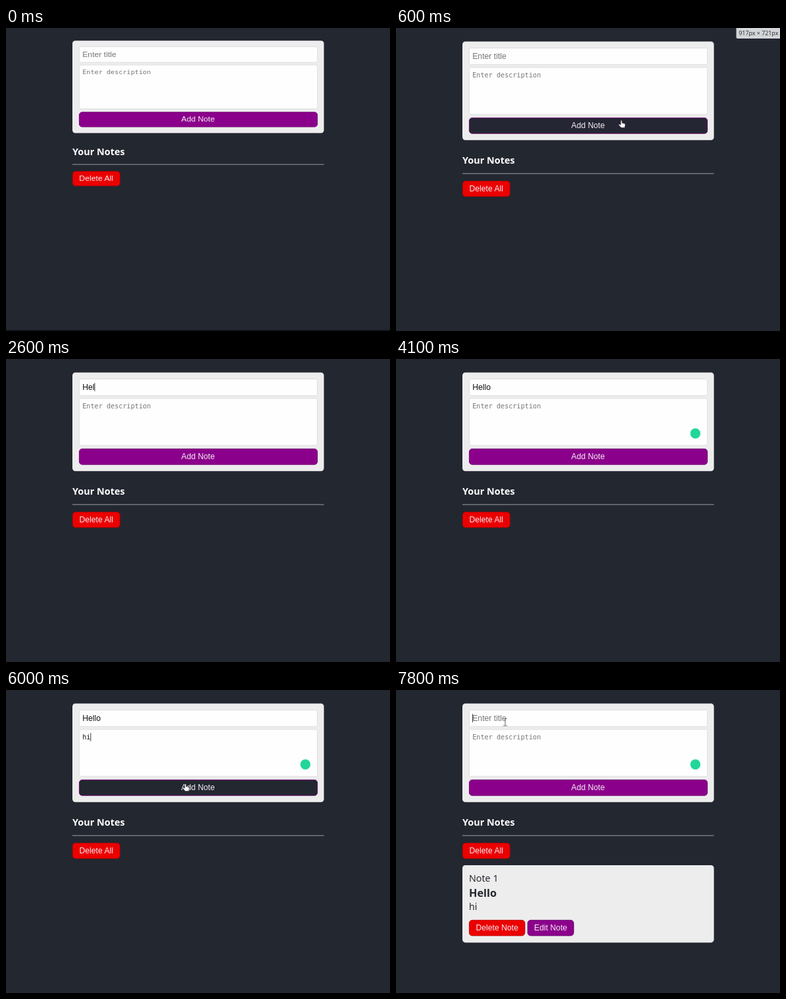
Write an HTML page that moves like this. It is 584 by 460 pixels and loops after 8000 ms.

```html
<!DOCTYPE html>
<html lang="en">
<head>
<meta charset="utf-8">
<title>Notes</title>
<style>
  html, body { margin: 0; width: 100%; height: 100%; overflow: hidden; background: #232730; }
  svg { display: block; width: 584px; height: 460px; }
  text { white-space: pre; }
  .ui { font: 12.23px "Liberation Sans", Arial, sans-serif; }
  .mono { font: 10.19px "DejaVu Sans Mono", monospace; }
  .body { font: 14.27px "Noto Sans", "Open Sans", sans-serif; fill: #272a31; }
  .head { font: bold 14.45px "Noto Sans", "Open Sans", sans-serif; fill: #fff; }
  .name { font: bold 16.3px "Noto Sans", "Open Sans", sans-serif; fill: #23262d; }
  .tag { font: 8.9px "Noto Sans", "Open Sans", sans-serif; fill: #30343a; }
  .light { fill: #f6eef6; }
  .card { fill: #ededed; }
  .field { fill: #fefefe; stroke: #dadada; stroke-width: .8; }
  .red { fill: #eb0000; stroke: #bd0000; stroke-width: .9; }
  .purple { fill: #8b008b; stroke: #6c006f; stroke-width: .9; }
</style>
</head>
<body>
<svg viewBox="0 0 584 460">
  <rect width="584" height="460" fill="#232730"/>
  <g id="page">
    <rect class="card" x="101" y="20.5" width="382.5" height="149.7" rx="4.5"/>
    <rect class="field" x="111.4" y="30.4" width="362.2" height="25.2" rx="2.5"/>
    <rect class="field" x="111.4" y="59.9" width="362.2" height="71.2" rx="2.5"/>
    <text class="ui" id="title" x="116.2" y="47"/>
    <text class="mono" id="desc" x="116.2" y="74.8"/>
    <rect id="caret" width=".8" height="12.6" fill="#111"/>
    <circle id="badge" cx="455.3" cy="113" r="7.7" fill="#22d69a"/>
    <rect id="add" class="purple" x="111.4" y="136.4" width="362.2" height="23.8" rx="4.5"/>
    <text class="ui light" x="292" y="152" text-anchor="middle">Add Note</text>
    <text class="head" x="101" y="206">Your Notes</text>
    <rect x="101" y="220.5" width="382.5" height="1" fill="#a0a2a6"/>
    <rect class="red" x="101.4" y="232.4" width="71.8" height="23.4" rx="4.5"/>
    <text class="ui light" x="137.2" y="247.9" text-anchor="middle">Delete All</text>
    <g id="note">
      <rect class="card" x="101" y="266" width="382.5" height="117.4" rx="4.5"/>
      <text class="body" x="111" y="291.3">Note 1</text>
      <text class="name" x="111" y="313.7">Hello</text>
      <text class="body" x="111" y="334">hi</text>
      <rect class="red" x="111.4" y="349.4" width="84.6" height="23.6" rx="4.5"/>
      <text class="ui light" x="153.7" y="365.2" text-anchor="middle">Delete Note</text>
      <rect class="purple" x="200.2" y="349.4" width="70" height="23.6" rx="4.5"/>
      <text class="ui light" x="235.2" y="365.2" text-anchor="middle">Edit Note</text>
    </g>
  </g>
  <rect id="edge" y="458.4" width="584" height="1.6" fill="#12151b"/>
  <g id="tag">
    <path d="M517.5 0H584V16H519.5Q517.5 16 517.5 14Z" fill="#d3d5d8"/>
    <text class="tag" x="551.3" y="11.3" text-anchor="middle">917px × 721px</text>
  </g>
  <g id="mouse">
    <path id="beam" d="M-2.6 -5.6Q0 -5.6 0 -4.4Q0 -5.6 2.6 -5.6M0 -4.6V4.6M-2.6 5.6Q0 5.6 0 4.4Q0 5.6 2.6 5.6" fill="none" stroke="#555" stroke-width=".9"/>
    <path id="hand" d="M-1 .8Q0 -.6 1 .8V4L5 5Q6 5.4 5.8 6.8L5 11H-.4L-4 7Q-4.4 5.6 -2.8 5.8L-1 7Z" fill="#fff" stroke="#24202b" stroke-width=".5"/>
    <path id="arrow" d="M0 0V10.2L2.5 8L4.1 11.6L5.8 10.8L4.2 7.4H7.4Z" fill="#20242c" stroke="#eee" stroke-width=".9" stroke-linejoin="round"/>
  </g>
</svg>
<script>
const LOOP = 8000;
const $ = id => document.getElementById(id);
const show = (id, on) => $(id).setAttribute('display', on ? 'inline' : 'none');
const place = (id, attrs) => { for (const k in attrs) $(id).setAttribute(k, attrs[k]); };
const clamp = v => Math.min(1, Math.max(0, v));
const mix = (a, b, k) => a + (b - a) * k;

// CSS "ease" curve
function ease(x) {
  let lo = 0, hi = 1, s = .5;
  for (let i = 0; i < 18; i++) {
    s = (lo + hi) / 2;
    const u = 1 - s;
    if (.75 * u * u * s + .75 * u * s * s + s * s * s < x) lo = s; else hi = s;
  }
  const u = 1 - s;
  return .3 * u * u * s + 3 * u * s * s + s * s * s;
}

// [time, x, y] for the two spells in which the pointer is visible
const trips = [
  [[180, 425, 128], [300, 366, 144], [400, 354, 144.5], [550, 352, 144.5], [700, 325, 132], [900, 222, 74], [1100, 169, 41], [1900, 169, 41]],
  [[5200, 282, 104], [5450, 274, 138], [5600, 273, 142.5], [6450, 273, 142.5], [6600, 272, 168], [6700, 270, 204.5],
   [6780, 268, 208], [6900, 238, 150], [7050, 188, 85], [7200, 166, 50], [7400, 166, 49], [LOOP, 166, 49]]
];

function pointer(t) {
  for (const trip of trips) {
    for (let i = 1; i < trip.length; i++) {
      const [t0, x0, y0] = trip[i - 1], [t1, x1, y1] = trip[i];
      if (t >= t0 && t < t1) {
        const k = (t - t0) / (t1 - t0);
        return [mix(x0, x1, k), mix(y0, y1, k)];
      }
    }
  }
  return null;
}

const hovers = [[210, 700], [5480, 6645]];
const hoverAt = t => Math.max(...hovers.map(([on, off]) =>
  t < off ? ease(clamp((t - on) / 500)) : 1 - ease(clamp((t - off) / 500))));

const titleKeys = [1900, 2100, 2400, 2800, 3000];
const descKeys = [4600, 4900];
const ADDED = 6200;

// focus periods: [from, to, field]
const focuses = [[1500, 3200, 'title'], [3200, ADDED, 'desc'], [7400, LOOP, 'title']];

function typed(word, keys, t) {
  return t < ADDED ? word.slice(0, keys.filter(k => k <= t).length) : '';
}

function fill(id, value, hint) {
  $(id).textContent = value || hint;
  $(id).setAttribute('fill', value ? '#111' : '#757575');
}

function drawCaret(t, values) {
  const focus = focuses.find(([a, b]) => t >= a && t < b);
  if (!focus) return show('caret', false);
  const [from, , field] = focus;
  const last = Math.max(from, ...[...titleKeys, ...descKeys].filter(k => k <= t));
  show('caret', (t - last) % 1000 < 500);
  const width = values[field] ? $(field).getComputedTextLength() : 0;
  place('caret', { x: 116.2 + width, y: field === 'title' ? 36.3 : 65.2 });
}

function drawMouse(t) {
  const p = pointer(t);
  show('mouse', p);
  if (!p) return;
  const [x, y] = p;
  const inside = (top, bottom) => x > 111 && x < 474 && y > top && y < bottom;
  const kind = inside(136, 160.5) ? 'hand' : inside(30, 56) || inside(59.5, 131.5) ? 'beam' : 'arrow';
  for (const id of ['beam', 'hand', 'arrow']) show(id, id === kind);
  place('mouse', { transform: `translate(${x} ${y})` });
}

function draw(t) {
  const squashed = t < 100;
  place('page', { transform: `scale(1 ${squashed ? .937 : 1})` });
  show('edge', squashed);
  show('tag', t >= 100 && t < 1000);

  const values = { title: typed('Hello', titleKeys, t), desc: typed('hi', descKeys, t) };
  fill('title', values.title, 'Enter title');
  fill('desc', values.desc, 'Enter description');
  drawCaret(t, values);

  const k = hoverAt(t);
  $('add').style.fill = `rgb(${mix(139, 34, k)},${mix(0, 39, k)},${mix(139, 48, k)})`;
  show('badge', t >= 3700);
  show('note', t >= ADDED);
  drawMouse(t);
}

const start = performance.now();
function tick() {
  draw((performance.now() - start) % LOOP);
  requestAnimationFrame(tick);
}
tick();
</script>
</body>
</html>
```
